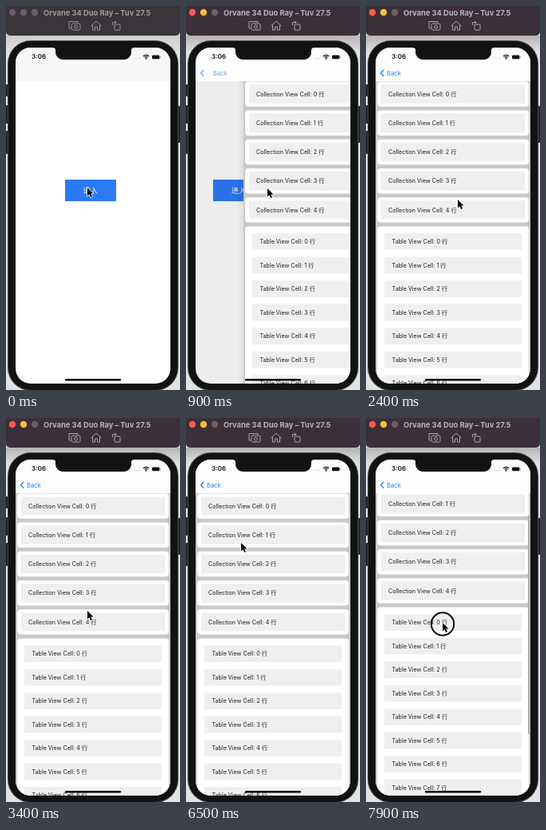
Animation, 218 px wide and 480 px high, one loop 8000 ms. Source, as an HTML page with a canvas:

```html
<!DOCTYPE html>
<html lang="en">
<head>
<meta charset="utf-8">
<title>Simulator</title>
<style>
  html, body { margin: 0; width: 100%; height: 100%; overflow: hidden; background: #dedede; }
  canvas { display: block; width: 218px; height: 480px; }
</style>
</head>
<body>
<canvas id="stage"></canvas>
<script>
const W = 218, H = 480, LOOP = 8000, STEP = 100;
const FONT = 'Inter, "Noto Sans CJK SC", "Noto Sans CJK", sans-serif';
const SCREEN = { x: 12, y: 52, w: 194, h: 420, r: 19 };
const NAV_BOTTOM = 94;

const canvas = document.getElementById('stage');
const ctx = canvas.getContext('2d');
const dpr = window.devicePixelRatio || 1;
canvas.width = W * dpr;
canvas.height = H * dpr;

// Pointer path: time, x, y
const PATH = [
  [0, 102, 227], [900, 102, 228], [1200, 110, 229], [1500, 118, 233],
  [1800, 118, 238], [2400, 115, 242], [2700, 113, 244], [2800, 113, 244],
  [3000, 105, 243], [3100, 105, 243], [3400, 102, 241], [4600, 102, 241],
  [4700, 97, 227], [5500, 48, 122], [5800, 42, 105], [5900, 42, 105],
  [6500, 69, 156], [6800, 111, 316], [7000, 105, 305], [7400, 105, 305],
  [7500, 105, 302], [7900, 96, 256], [8000, 96, 256]
];

function pointerAt(t) {
  let i = 1;
  while (i < PATH.length - 1 && PATH[i][0] < t) i++;
  const [t0, x0, y0] = PATH[i - 1], [t1, x1, y1] = PATH[i];
  const k = (t - t0) / (t1 - t0);
  return { x: x0 + (x1 - x0) * k, y: y0 + (y1 - y0) * k };
}

function pushOffset(t) {
  if (t < 600) return SCREEN.w;
  if (t < 800) return 178;
  return t > 2500 ? 0 : 60 * Math.exp((900 - t) / 221);
}

function box(x, y, w, h, r, fill) {
  ctx.beginPath();
  ctx.roundRect(x, y, w, h, r);
  ctx.fillStyle = fill;
  ctx.fill();
}

function disc(x, y, r, fill) {
  ctx.beginPath();
  ctx.arc(x, y, r, 0, Math.PI * 2);
  ctx.fillStyle = fill;
  ctx.fill();
}

function text(str, x, y, size, fill, weight = 400, align = 'left') {
  ctx.font = `${weight} ${size}px ${FONT}`;
  ctx.textAlign = align;
  ctx.fillStyle = fill;
  ctx.fillText(str, x, y);
}

function line(points, stroke, width, close) {
  ctx.beginPath();
  points.forEach(([x, y], i) => i ? ctx.lineTo(x, y) : ctx.moveTo(x, y));
  if (close) ctx.closePath();
  ctx.strokeStyle = stroke;
  ctx.lineWidth = width;
  ctx.stroke();
}

function outline(x, y, w, h, r, stroke) {
  ctx.beginPath();
  ctx.roundRect(x, y, w, h, r);
  ctx.strokeStyle = stroke;
  ctx.lineWidth = 1;
  ctx.stroke();
}

function drawTitleBar(t) {
  const active = t >= 300;
  box(0, -6, W, 43, 5, active ? '#3b3039' : '#3a343b');
  const lights = active ? ['#fc5b57', '#f5bd3a', '#696068'] : ['#686169', '#686169', '#686169'];
  lights.forEach((c, i) => disc(8 + i * 14, 8, 4.2, c));
  text('Orvane 34 Duo Ray – Tuv 27.5', 47, 11.6, 9.3, active ? '#bab3b9' : '#a09aa0', 700);

  const c = active ? '#aca4ab' : '#989198';
  // Camera
  line([[81, 28], [79, 28], [79, 19.5], [90, 19.5], [90, 21]], c, 1);
  outline(82, 22, 11, 8, 1.5, c);
  ctx.beginPath();
  ctx.arc(87.5, 26, 2, 0, Math.PI * 2);
  ctx.stroke();
  // Home
  line([[106.5, 25], [113, 19], [119.5, 25]], c, 1);
  line([[108.5, 24], [108.5, 30], [111.5, 30], [111.5, 26], [114.5, 26], [114.5, 30], [117.5, 30], [117.5, 24]], c, 1);
  // Rotate
  outline(136, 23, 7, 7, 1, c);
  line([[133.5, 24], [133.5, 20.5], [138, 20.5]], c, 1);
  line([[136, 18.5], [138, 20.5], [136, 22.5]], c, 1);
}

function drawBody(t) {
  ctx.fillStyle = '#e2e2e2';
  ctx.fillRect(0, 0, W, H);
  const shade = ctx.createLinearGradient(0, 37, 0, 58);
  shade.addColorStop(0, t >= 300 ? '#b4b4b4' : '#cdcdcd');
  shade.addColorStop(1, '#e2e2e2');
  ctx.fillStyle = shade;
  ctx.fillRect(0, 37, W, 21);
  for (const [y, h] of [[98, 15], [124, 23], [156, 29]]) box(0, y, 4, h, 1, '#242424');
  box(214, 125, 4, 46, 1, '#242424');
  box(2, 43, 214, 438, 29, '#484848');
  box(3, 44, 212, 436, 28, '#111211');
}

function drawHome(off) {
  const p = 1 - off / SCREEN.w;
  const x = SCREEN.x - p * 58;
  ctx.fillStyle = '#fff';
  ctx.fillRect(SCREEN.x, SCREEN.y, SCREEN.w, SCREEN.h);
  box(x + 62, 217, 64, 27, 0, '#2d7af6');
  text('进入', x + 94, 233.5, 9.2, '#fff', 400, 'center');
  ctx.fillStyle = `rgba(0,0,0,${0.1 * p})`;
  ctx.fillRect(SCREEN.x, NAV_BOTTOM, SCREEN.w, 380);
}

function drawList(off, scroll) {
  ctx.save();
  ctx.beginPath();
  ctx.rect(SCREEN.x, NAV_BOTTOM, SCREEN.w, 380);
  ctx.clip();
  ctx.translate(off, 0);
  if (off > 1) {
    const edge = ctx.createLinearGradient(4, 0, 12, 0);
    edge.addColorStop(0, 'rgba(0,0,0,0)');
    edge.addColorStop(1, 'rgba(0,0,0,.07)');
    ctx.fillStyle = edge;
    ctx.fillRect(4, NAV_BOTTOM, 8, 380);
  }
  ctx.fillStyle = '#c9c9c9';
  ctx.fillRect(SCREEN.x, NAV_BOTTOM, SCREEN.w, 380);
  ctx.translate(0, -scroll);
  for (let i = 0; i < 5; i++) {
    const y = 94.4 + i * 36.2;
    box(14, y, 190, 31.4, 4, '#fff');
    box(19, y + 4, 180, 23.4, 0, '#efefef');
    text(`Collection View Cell: ${i} 行`, 28, y + 18.3, 7.2, '#1c1c1c');
  }
  box(14, 275.4, 190, 260, 4, '#fff');
  for (let i = 0; i < 8; i++) {
    const y = 284.3 + i * 29.5;
    box(23, y, 172, 20.6, 0, '#efefef');
    text(`Table View Cell: ${i} 行`, 32.5, y + 12.9, 7.15, '#1c1c1c');
  }
  ctx.restore();
  if (scroll > 0) box(203, 122, 1.6, 273, 0.8, '#a5a5a5');
}

function drawNav(off) {
  const p = 1 - off / SCREEN.w;
  ctx.fillStyle = p > 0 ? '#fdfdfd' : '#f7f7f7';
  ctx.fillRect(SCREEN.x, SCREEN.y, SCREEN.w, NAV_BOTTOM - SCREEN.y);
  if (p <= 0) return;
  ctx.globalAlpha = p;
  line([[22.3, 79.8], [18.6, 83.8], [22.3, 87.8]], '#2682f5', 1.3);
  text('Back', 26 + off * 0.13, 86.6, 7.6, '#2682f5');
  ctx.globalAlpha = 1;
}

function drawStatus() {
  text('3:06', 32, 66.4, 8, '#111', 600);
  for (let i = 0; i < 4; i++) disc(161 + i * 2.3, 65.5, 0.6, '#b4b4b4');
  ctx.strokeStyle = '#111';
  ctx.lineWidth = 1.2;
  for (const r of [2.7, 4.9]) {
    ctx.beginPath();
    ctx.arc(175.5, 66.3, r, -Math.PI * 0.76, -Math.PI * 0.24);
    ctx.stroke();
  }
  disc(175.5, 65.7, 1, '#111');
  box(183, 61.4, 9.4, 4.9, 1.4, '#111');
  box(192.9, 63, 0.8, 1.8, 0.4, '#777');
}

function drawNotch() {
  ctx.fillStyle = '#111211';
  ctx.beginPath();
  ctx.moveTo(58, 51);
  ctx.lineTo(58, 52);
  ctx.quadraticCurveTo(62, 52, 62, 55);
  ctx.arcTo(62, 67, 72, 67, 9);
  ctx.arcTo(157, 67, 157, 55, 9);
  ctx.lineTo(157, 55);
  ctx.quadraticCurveTo(157, 52, 161, 52);
  ctx.lineTo(161, 51);
  ctx.fill();
}

function drawPointer(t) {
  const { x, y } = pointerAt(t);
  const pressed = (t >= 100 && t < 300) || t >= 7500;
  if (pressed) {
    ctx.beginPath();
    ctx.arc(x, y + 1.5, 14.2, 0, Math.PI * 2);
    ctx.strokeStyle = '#111';
    ctx.lineWidth = 2;
    ctx.stroke();
  }
  ctx.save();
  ctx.translate(x, y);
  ctx.lineJoin = 'round';
  line([[0, 0], [0, 10.5], [2.4, 8.3], [4.1, 12.1], [5.9, 11.3], [4.3, 7.6], [7.5, 7.5]], '#fff', 1.4, true);
  ctx.fillStyle = '#000';
  ctx.fill();
  ctx.restore();
}

function draw(t) {
  const off = pushOffset(t);
  const scroll = t >= 7500 ? Math.max(0, 295 - pointerAt(t).y) : 0;
  ctx.setTransform(dpr, 0, 0, dpr, 0, 0);
  drawBody(t);
  drawTitleBar(t);
  ctx.save();
  ctx.beginPath();
  ctx.roundRect(SCREEN.x, SCREEN.y, SCREEN.w, SCREEN.h, SCREEN.r);
  ctx.clip();
  drawHome(off);
  if (off < SCREEN.w) drawList(off, scroll);
  drawNav(off);
  drawStatus();
  box(74, 466, 70, 2.6, 1.3, '#000');
  ctx.restore();
  drawNotch();
  drawPointer(t);
}

function tick() {
  const t = performance.now() % LOOP;
  draw(Math.floor(t / STEP) * STEP);
  requestAnimationFrame(tick);
}
tick();
</script>
</body>
</html>
```
